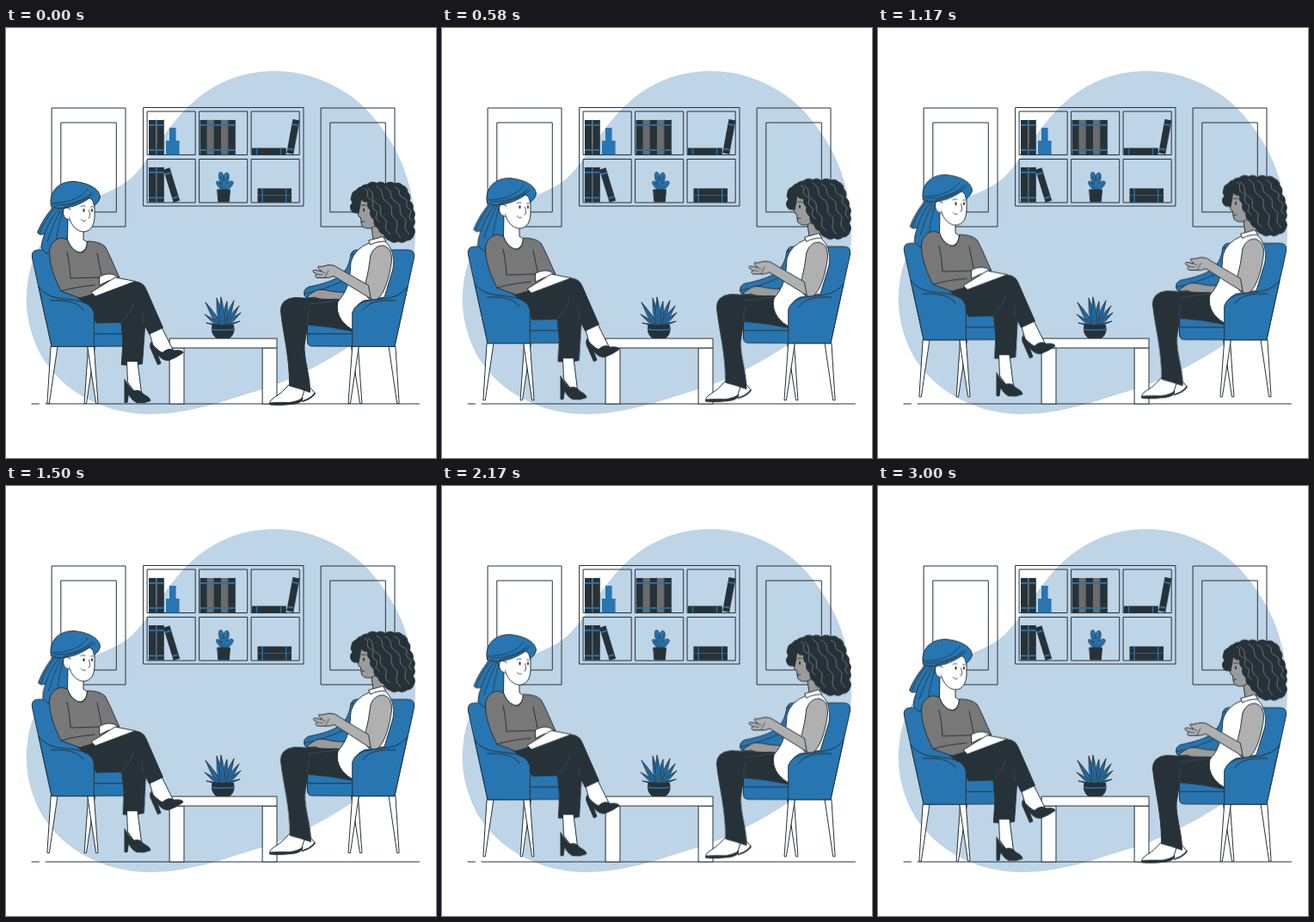
Animation, 500 px wide and 500 px high, one loop 3.04 s. Source, as an HTML page:

```html
<!DOCTYPE html>
<html lang="en">
<head>
<meta charset="utf-8">
<title>Conversation</title>
<style>
html, body { margin: 0; width: 100%; height: 100%; overflow: hidden; background: #fff; }
svg { display: block; width: 100vw; height: 100vh; }
</style>
</head>
<body>
<svg id="stage" viewBox="0 0 500 500" stroke-linejoin="round" stroke-linecap="round"></svg>
<script>
const INK = '#263238', BLUE = '#2776b2', PALE = '#bed4e7', GREY = '#787878',
      SKIN = '#b0b0b0', SHADE = '#9b9b9b', WHITE = '#fff';
const LOOP = 3040;

const path = (d, fill = 'none', stroke = INK, width = 1) =>
  `<path d="${d}" fill="${fill}" stroke="${stroke}" stroke-width="${width}"/>`;
const box = (x, y, x2, y2, fill = 'none', stroke = INK) =>
  path(`M${x},${y}H${x2}V${y2}H${x}Z`, fill, stroke);
const flat = (x, y, x2, y2, fill) => box(x, y, x2, y2, fill, 'none');
const group = (id, ...parts) => `<g id="${id}">${parts.join('')}</g>`;
const dot = (x, y, rx, ry) => `<ellipse cx="${x}" cy="${y}" rx="${rx}" ry="${ry}" fill="${INK}"/>`;

// Pointed leaf from a base to a tip, with a dark midrib
function leaf(x, y, tx, ty, w) {
  const mx = x + (tx - x) * 0.4, my = (y + ty) / 2;
  return path(`M${x - w / 2},${y}Q${mx - w},${my} ${tx},${ty}Q${mx + w},${my} ${x + w / 2},${y}Z`, BLUE, INK, 0.7) +
    path(`M${x},${y}Q${mx},${my} ${tx},${ty}`, 'none', INK, 0.6);
}

// Upright book with two bands
function book(x, y, w, h, fill = INK) {
  return flat(x, y, x + w, y + h, fill) +
    flat(x, y + 5, x + w, y + 6.8, BLUE) + flat(x, y + h - 6, x + w, y + h - 4.2, BLUE) +
    path(`M${x + w},${y}v${h}`, 'none', INK, 0.6);
}
const lean = (x, y, angle, w, h) => `<g transform="translate(${x} ${y}) rotate(${angle})">${book(0, 0, w, h)}</g>`;

function lying(x, y, w, h) {
  return flat(x, y, x + w, y + h, INK) +
    flat(x + 5, y, x + 6.4, y + h, BLUE) + flat(x + w - 7, y, x + w - 5.6, y + h, BLUE);
}

function room() {
  let s = path('M313,50C342,50 371,59 398,77C423,94 440,119 452,140C468,169 476,204 476,240' +
    'C476,292 452,335 412,362C374,388 330,411 292,422C255,433 214,449 168,449' +
    'C110,449 65,420 42,383C26,354 21,325 25,297C30,257 55,223 92,203' +
    'C113,192 132,187 146,174C164,157 178,130 200,104C230,69 267,50 313,50Z', PALE, 'none');
  for (const x of [53.5, 366.5]) s += box(x, 93, x + 85.5, 231) + box(x + 10.7, 110, x + 74.8, 214);
  s += box(160, 92.5, 346, 207);
  for (const x of [164.5, 225, 285.5])
    for (const y of [97, 152.5]) s += box(x, y, x + 55.7, y + 50.5);

  s += book(166, 107, 8.3, 40) + book(175.2, 107, 8.3, 40);
  s += flat(186, 131, 201.6, 147.3, BLUE) + flat(190, 116, 197.6, 131, BLUE);
  [INK, '#6b6b6b', INK, '#6b6b6b', INK].forEach((c, i) => s += book(225.6 + i * 8.2, 107, 8.2, 40, c));
  s += lying(285.8, 139.5, 40, 7.7) + lean(333.5, 106, 10.5, 7.8, 40);
  s += book(166, 162, 8.3, 40.5) + book(175.2, 162, 8.3, 40.5) + lean(183, 164.7, -17, 7.5, 40);
  s += lying(292.5, 186.5, 39.5, 8) + lying(292.5, 194.5, 39.5, 8.3);
  s += path('M292.5,194.5h39.5', 'none', '#50626c', 0.6);

  // Shelf cactus
  s += path('M250,188C246,184 243,180 245.5,178Q248,178 250,182C246,173 247,167 250,167.5Q253,168 253.5,178' +
    'C252,171 255,167 258,168.5Q261,172 257.5,181C260,177 264,177 264.5,180Q262,187 256,188Z', BLUE, INK, 0.6);
  s += path('M250,172L252,186M258,171L254,186M262,181L256,187M247,180L251,187', 'none', INK, 0.5);
  s += path('M246,188H260.5L259.3,202H247.2Z', INK);

  s += path('M30,437H38.5M46,437H480.5');
  s += box(190.5, 372, 207, 437, WHITE) + box(298.5, 372, 315, 437, WHITE) + box(190.5, 361, 315, 372, WHITE);

  // Table plant: leaf tips
  const tips = [[237, 326], [232, 319], [265, 317], [271, 323], [245, 314], [257, 318], [250, 313],
    [231, 333], [273, 331], [233, 343], [272, 341]];
  for (const [tx, ty] of tips) s += leaf(252 + (tx - 252) * 0.25, 346, tx, ty, 4);
  s += path('M240,345.5H264.5Q267,355 260,360.5H244.5Q237.5,355 240,345.5Z', INK);
  s += path('M239.5,350.5Q252,352 265,350.5', 'none', BLUE, 1.3);
  return s;
}

const chairBack = () =>
  path('M96,370H103.5L93.5,436.5H91.5Z', WHITE) +
  path('M95,370H102.3L107,436.5H105Z', WHITE) +
  path('M52.5,370H60L50.3,436.5H48.3Z', WHITE) +
  path('M53,370L30.4,267Q29,258 38,258H97Q103,258 104,264L106,342H153Q154.5,343 154.5,347V365Q154,370 149,370Z', BLUE) +
  path('M102,355.7H154');

const chairSide = () =>
  path('M53,370L38,301Q45,311 60,314L80,316.5Q99,319 102.3,331V370Z', BLUE) +
  path('M52,317Q82,315 90,328');

const mirror = s => `<g transform="translate(505 0) scale(-1 1)">${s}</g>`;

function listener() {
  const tail = group('tail',
    path('M58,205C50,213 41,226 36.5,238Q40,242 45,239Q41,249 41,256L47,262H70Q72,240 72,218L66,206Z', BLUE) +
    path('M62,209Q51,222 45,239M64,210Q54,230 48,248M66,212Q59,235 57,258M59,207Q45,222 39,239', 'none', INK, 0.8));

  const head =
    path('M72,218L71.5,247Q78,261 87,261Q94,258 94.5,249L90,246V235Z', WHITE) +
    path('M71,207C72,222 78,237 91,237C99,236 102.5,229 103,220V199L80,195Z', WHITE) +
    path('M75,211Q69,206 66.5,212Q65.5,221 73,223', WHITE) +
    path('M52.5,207C49,190 62,178 79,178.5C96,180 109,187 109.5,197Q108,203 102.5,206.5Q102,200 97.5,197.5' +
      'C88,204 79,208 69,209Q59,211 52.5,207Z', BLUE) +
    path('M53,204C72,203 86,199 95,187M56,206C77,206 91,200 100,191M67,208C83,204 94,199 103,192', 'none', INK, 0.8) +
    dot(90.5, 212, 1.1, 2) + dot(100, 212, 1, 1.9) +
    path('M87,207.5Q89,206 92,207M98.5,208Q100,207 102,208M96.5,212Q98.5,219 97,220.5L95.8,220.8M87.5,222.5Q89,225.5 92.5,224', 'none', INK, 0.8);

  const shin = group('shin', path('M133,330L136,366L134.3,391.5Q146,393.5 158.5,390.5L162,340Z', INK));
  const lowFoot =
    path('M140.5,388L141.5,412L150,424L157.5,424L153,388Z', WHITE) +
    path('M138,409Q143,418 149,422Q156,420 160,426Q168,430 168,433.5Q160,437 152,435.5Q146,433 142.5,425L141,435.5H138Q138,420 138,409Z', INK);
  const highFoot =
    path('M166,352L171,369L182,379L194,374L181,348Z', WHITE) +
    path('M168.5,365.5Q174,375 182,377.5Q189,371 196,375Q205,374 206,377.5Q199,383 189,386.5Q181,387 175.5,378L180,390L176.5,391.5L168,372Q167,368 168.5,365.5Z', INK);
  const trousers = path('M83,313C105,308 130,297 151,295Q160,296 163,304L182.5,348.5L166.5,356L160,343' +
    'Q150,343 136,342L105,343L98,326Z', INK) +
    path('M135,341Q145,331 148,320M160,343L158,330', 'none', '#42525b', 0.7);

  const top =
    path('M50.5,258Q53,246 64,244L71.5,246C75,258 84,262 89,261Q94,258 94.5,248Q109,248 115,254C121,264 126,278 132,290' +
      'L119,293L106,308L86,314L64,306C56,290 50,275 50.5,258Z', GREY) +
    path('M71,261Q74,273 75,291L109,290M106,262L111,287M64,306Q80,301 103,299', 'none');
  const hand = path('M109,289Q118,284 126,287L133,292Q128,295 119,294L109,299Z', WHITE);
  const pad = path('M99.5,307L127,290L150.5,294.5L104,312Z', WHITE);

  return tail + shin + lowFoot + highFoot + trousers + head + top + hand + pad;
}

// Outline of shallow curls through the given points
function curls(points) {
  return points.map(([x, y], i) => {
    if (!i) return `M${x},${y}`;
    const r = Math.hypot(x - points[i - 1][0], y - points[i - 1][1]) * 0.85;
    return `A${r},${r} 0 0 1 ${x},${y}`;
  }).join('') + 'Z';
}

// Wavy strand between two points
function strand(x, y, x2, y2, sag) {
  let d = `M${x},${y}`;
  for (let i = 1; i <= 24; i++) {
    const t = i / 24, w = Math.sin(t * 20) * 1.5;
    d += `L${(x + (x2 - x) * t + sag * Math.sin(Math.PI * t) + w).toFixed(1)},${(y + (y2 - y) * t - w * 0.4).toFixed(1)}`;
  }
  return path(d, 'none', '#87939a', 0.7);
}

function speaker() {
  const feet =
    path('M344,421L354,418.5L359,424.5Q358,429 345,434L335,432Z', WHITE) +
    path('M345,434Q355,431 359,425', 'none', INK, 1.8) +
    path('M330,414Q321,425 310,431Q305,435 308,437.5Q328,440 343,433.5L348,418Z', WHITE) +
    path('M307,436Q318,435 330,435.5Q340,434 345,430Q345,435 336,437Q319,439 307,438Z', INK);
  const trousers = group('slacks',
    path('M384,316L336,313.5Q319,315 319.5,329C322,355 330,382 329.5,416Q341,419 353.5,423.5' +
      'C354,405 346,385 347,368L351,345Q378,347 405,353V320Z', INK) +
    path('M385,317L352,321M351,345Q350,335 353,328', 'none', '#42525b', 0.7));
  const farArm = path('M399,307Q384,308 373,305Q364,303 359,306L350,312Q352,315 359,313L367,316Q384,314 399,317Z', SHADE);
  const neck = path('M424,226L427,246L440,246L439,224Z', SHADE);
  const top =
    path('M422,250Q405,257 401,272C400,291 398,305 386,318Q383,330 391,341Q397,348 405,352V331Q406,322 416,317L440,313L450,280Q454,260 440,247Z', WHITE) +
    path('M422,247Q430,245 438,242.5L442,248Q431,248 424,252Z', WHITE);
  const hand = group('hand',
    path('M424,314.5L381,288.5Q376,291 369,290.5L361,290.5Q358,288 361.5,286.5L357,283.5Q356,281 360,281.5L367,283' +
      'L363,279Q362,276 366,277.5L375,275.5Q382,275 387,279.5L421,299Z', SKIN) +
    path('M361,286.5L368,287M367,283L371,285M375,282L371,290', 'none', INK, 0.7));
  const arm = path('M424,264Q429,252 439,253Q449,256 448.5,270C446,290 440,309 432,315Q426,318 421,314L418,299Q422,282 424,264Z', SKIN, 'none') +
    path('M418,297Q422,282 424,264Q429,252 439,253Q449,256 448.5,270C446,290 440,309 432,315Q427,318 420,313');

  const backHair = curls([[411, 188], [420, 182], [431, 180.5], [441, 181.5], [452, 181], [461, 183], [467, 191], [469, 201],
    [473, 211], [474, 221], [473, 231], [474, 241], [466, 247], [456, 248], [446, 247], [440, 240], [433, 233], [428, 223], [424, 212], [421, 202], [412, 198]]);
  const farHair = curls([[414, 213], [407, 215], [401, 211], [403, 203], [402, 195], [407, 189], [416, 185]]);
  const head =
    path(farHair, INK) +
    path('M413,194Q412.5,206 409.5,217.5Q410,220 412.5,220.5L413.5,229Q417,234.5 425,232.5L434,228L430,194Z', SHADE) +
    path(backHair, INK) +
    [[421, 187, 445, 240, 3], [431, 184, 457, 244, 5], [441, 185, 467, 240, 5], [452, 185, 471, 225, 5],
      [417, 187, 433, 226, 2]].map(a => strand(...a)).join('') +
    dot(416, 211.5, 1, 2) + path('M413.5,206.5Q416,204.5 419,206.5M413,225.5L417,225', 'none', INK, 0.9);

  return farArm + feet + trousers + neck + top + head + arm + hand;
}

const farRest = path('M401,263C398,285 388,294 352,301Q345,304 347,311L352,317H404V263Z', BLUE) +
  path('M347,309Q368,305 395,293', 'none', INK, 0.8);

document.getElementById('stage').innerHTML = room() + group('float',
  chairBack(), listener(), chairSide(),
  mirror(chairBack()), farRest, speaker(), mirror(chairSide()));

// Everyone rises for half the loop and sinks back in the other half
function sway(id, change, origin = '0 0') {
  const el = document.getElementById(id);
  el.style.transformOrigin = origin;
  const rest = change.replace(/-?[\d.]+(?=px|deg)/g, '0');
  el.animate([{ transform: rest }, { transform: change }, { transform: rest }], { duration: LOOP, iterations: Infinity });
}
sway('float', 'translate(0px, -10px)');
sway('tail', 'rotate(-2deg)', '60px 208px');
sway('shin', 'rotate(-1.4deg)', '148px 315px');
sway('slacks', 'rotate(-0.5deg)', '360px 320px');
sway('hand', 'rotate(1.5deg)', '425px 308px');
</script>
</body>
</html>
```
